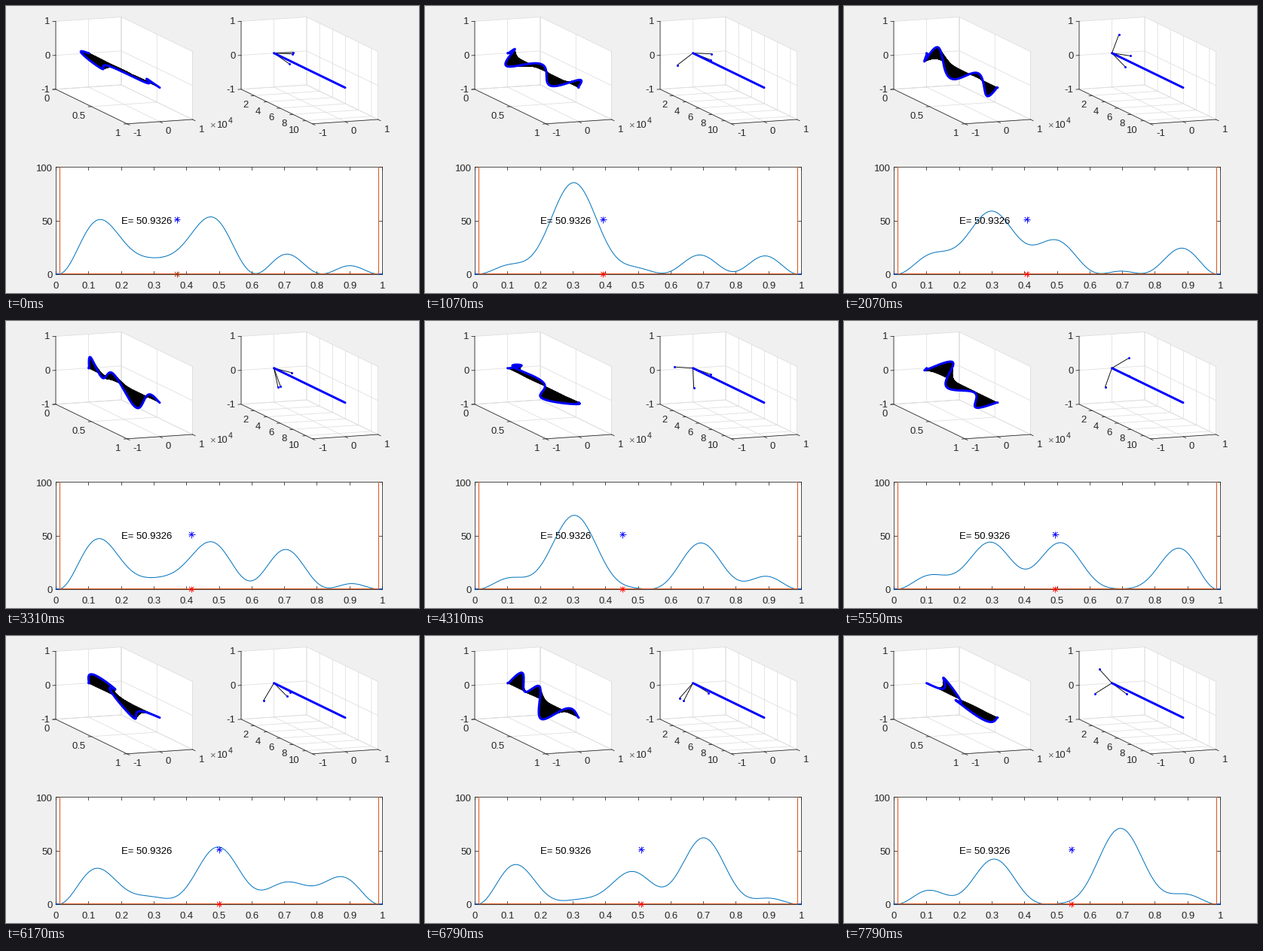
Animation of 548 by 382 pixels, one loop 8000 ms. Source, as a matplotlib script:

```python
import numpy as np
import matplotlib.pyplot as plt
from matplotlib.animation import FuncAnimation
from matplotlib.collections import LineCollection

W, H, DPI = 548, 382, 100
PT = 72 / DPI
DARK, GRID, BLUE = "#262626", "#dedede", "#0000ff"
CURVE, WALL = "#0072bd", "#d95319"
TICK_MS, LOOP_MS, STEPS = 40, 8000, 26

# Superposition of three eigenstates in a box, equal weights
MODES = np.array([1, 2, 5])
LEFT_EDGE, WIDTH = 0.0078, 0.9844
ENERGY = 50.9326
GROUND = ENERGY * 3 / np.sum(MODES**2)
DT = 0.005
PSI_SCALE, DENSITY_SCALE, COEF = 0.275, 13.55, 3**-0.5

plt.rcParams["font.family"] = "Liberation Sans"
fig = plt.figure(figsize=(W / DPI, H / DPI), dpi=DPI, facecolor="#f0f0f0")
ax = fig.add_axes([0, 0, 1, 1])
ax.set_xlim(0, W)
ax.set_ylim(H, 0)
ax.axis("off")


def line(xs, ys, color=DARK, width=0.8, **kw):
    return ax.plot(xs, ys, color=color, lw=width * PT, **kw)[0]


def label(x, y, text, ha="center", size=13.1, color=DARK):
    ax.text(x, y, text, ha=ha, va="center_baseline", fontsize=size * PT, color=color)


def project(x, y, z, shift=0):
    """Box coordinates (x in 0..1, y and z in -1..1) to pixels."""
    px = 66 + shift + 94.5 * x + 43.5 * (y + 1)
    py = 110.8 + 46 * x - 2.9 * (y + 1) - 45.2 * (z + 1)
    return px, py


def path3d(points, shift, color, width=0.8):
    line(*project(*np.array(points, float).T, shift), color, width)


def draw_box(shift, xticks):
    outline = [(0, -1, 1), (0, 1, 1), (1, 1, 1), (1, 1, -1), (1, -1, -1), (0, -1, -1)]
    ax.fill(*project(*np.array(outline, float).T, shift), color="white", lw=0)
    for v in (-1, 0, 1):
        path3d([(0, -1, v), (0, 1, v), (1, 1, v)], shift, GRID)
        path3d([(0, v, 1), (0, v, -1), (1, v, -1)], shift, GRID)
    for v in [0, 1] + [pos for pos, _ in xticks]:
        path3d([(v, 1, 1), (v, 1, -1), (v, -1, -1)], shift, GRID)
    path3d([(0, -1, 1), (0, -1, -1), (1, -1, -1), (1, 1, -1)], shift, DARK)

    for v in (-1, 0, 1):
        px, py = project(0, -1, v, shift)
        line([px - 4, px], [py + 0.3, py])
        label(px - 7.5, py - 0.5, str(v), "right")
        px, py = project(1, v, -1, shift)
        line([px, px + 3.5], [py, py + 1.7])
        label(px + 8, py + 12, str(v), "left")
    for pos, text in xticks:
        px, py = project(pos, -1, -1, shift)
        line([px - 4, px], [py + 0.3, py])
        label(px - 8, py + 11.5, text, "right")


RIGHT = 246
draw_box(0, [(0, "0"), (0.5, "0.5"), (1, "1")])
draw_box(RIGHT, [(n / 11, str(n)) for n in range(2, 11, 2)])
label(273.5, 157.5, "×", color="#666666")
label(287, 157, "10")
label(297.5, 152, "4", size=10.5)


# Density plot
X0, X1, Y0, Y1 = 66, 499, 357, 214


def plot_xy(x, y):
    return X0 + (X1 - X0) * np.asarray(x), Y0 + (Y1 - Y0) * np.asarray(y) / 100


ax.fill([X0, X1, X1, X0], [Y0, Y0, Y1, Y1], color="white", lw=0)
line([X0, X1, X1, X0, X0], [Y0, Y0, Y1, Y1, Y0])
for i in range(11):
    px, _ = plot_xy(i / 10, 0)
    line([px, px], [Y0, Y0 - 4])
    line([px, px], [Y1, Y1 + 4])
    label(px + 0.5, 372, f"{i / 10:g}")
for v in (0, 50, 100):
    _, py = plot_xy(0, v)
    line([X0, X0 + 4], [py, py])
    line([X1, X1 - 4], [py, py])
    label(62, py + 1, str(v), "right")

x = np.linspace(0, 1, 501)
u = (x - LEFT_EDGE) / WIDTH
inside = (u > 0) & (u < 1)
waves = np.sin(np.pi * np.outer(MODES, u)) * inside

FLOOR = 0.7  # the potential rests just above the axis line
line(*plot_xy([0, 1], [FLOOR, FLOOR]), color=BLUE)
density_line = line([], [], CURVE, 1)
line(*plot_xy([0.0115, 0.0115, 0.9885, 0.9885], [100, FLOOR, FLOOR, 100]),
     color=WALL, width=1)
label(153, 286, f"E= {ENERGY}", "left", color="black")


def star(color):
    """Eight-armed asterisk: four crossing strokes."""
    arms = LineCollection([], colors=color, linewidths=0.9 * PT, zorder=4)
    ax.add_collection(arms)
    return arms


def place_star(arms, px, py):
    segments = []
    for angle in np.arange(4) * np.pi / 4:
        dx, dy = 4.4 * np.cos(angle), 4.4 * np.sin(angle)
        segments.append([(px - dx, py - dy), (px + dx, py + dy)])
    arms.set_segments(segments)


energy_star, mean_star = star(BLUE), star("red")

# Moving parts of the two boxes
base = np.column_stack(project(x, 0 * x, 0 * x))
stems = LineCollection([], colors="black", linewidths=0.9 * PT, zorder=2)
ax.add_collection(stems)
wave_line = line([], [], BLUE, 3, zorder=3, solid_joinstyle="round", solid_capstyle="round")

origin = project(0, 0, 0, RIGHT)
arrows = [line([], [], "black", 0.9, zorder=2) for _ in MODES]
tips = line([], [], BLUE, 0, ls="none", marker="o", ms=3 * PT, mew=0, zorder=3)
line(*project(np.array([0.0, 1.0]), 0, 0, RIGHT), color=BLUE, width=3, zorder=3,
     solid_capstyle="round")


def start_ms(step):
    """Time at which a step appears; every eleventh one is held longer."""
    return 0 if step == 0 else 140 + 310 * (step - 1) + 70 * ((step + 8) // 11)


STARTS = [start_ms(k) for k in range(STEPS)]


def update(frame):
    now = frame * TICK_MS + TICK_MS - 1
    step = int(np.searchsorted(STARTS, now, side="right")) - 1
    phases = np.exp(-1j * GROUND * MODES**2 * DT * (step + 1))

    mix = phases @ waves
    psi = -PSI_SCALE * mix
    curve = np.column_stack(project(x, psi.real, psi.imag))
    wave_line.set_data(*curve.T)
    stems.set_segments(np.stack([base, curve], axis=1))

    ends = project(0, COEF * phases.real, COEF * phases.imag, RIGHT)
    tips.set_data(*ends)
    for arrow, ex, ey in zip(arrows, *ends):
        arrow.set_data([origin[0], ex], [origin[1], ey])

    density = np.abs(mix) ** 2
    density_line.set_data(*plot_xy(x, DENSITY_SCALE * density))
    mean = np.sum(x * density) / np.sum(density)
    place_star(energy_star, *plot_xy(mean, ENERGY))
    place_star(mean_star, *plot_xy(mean, 0))
    mean_star.set_color("#9a3412" if step == 0 else "red")
    return []


anim = FuncAnimation(fig, update, frames=LOOP_MS // TICK_MS, interval=TICK_MS,
                     repeat=True, repeat_delay=0, blit=False)
plt.show()
```
